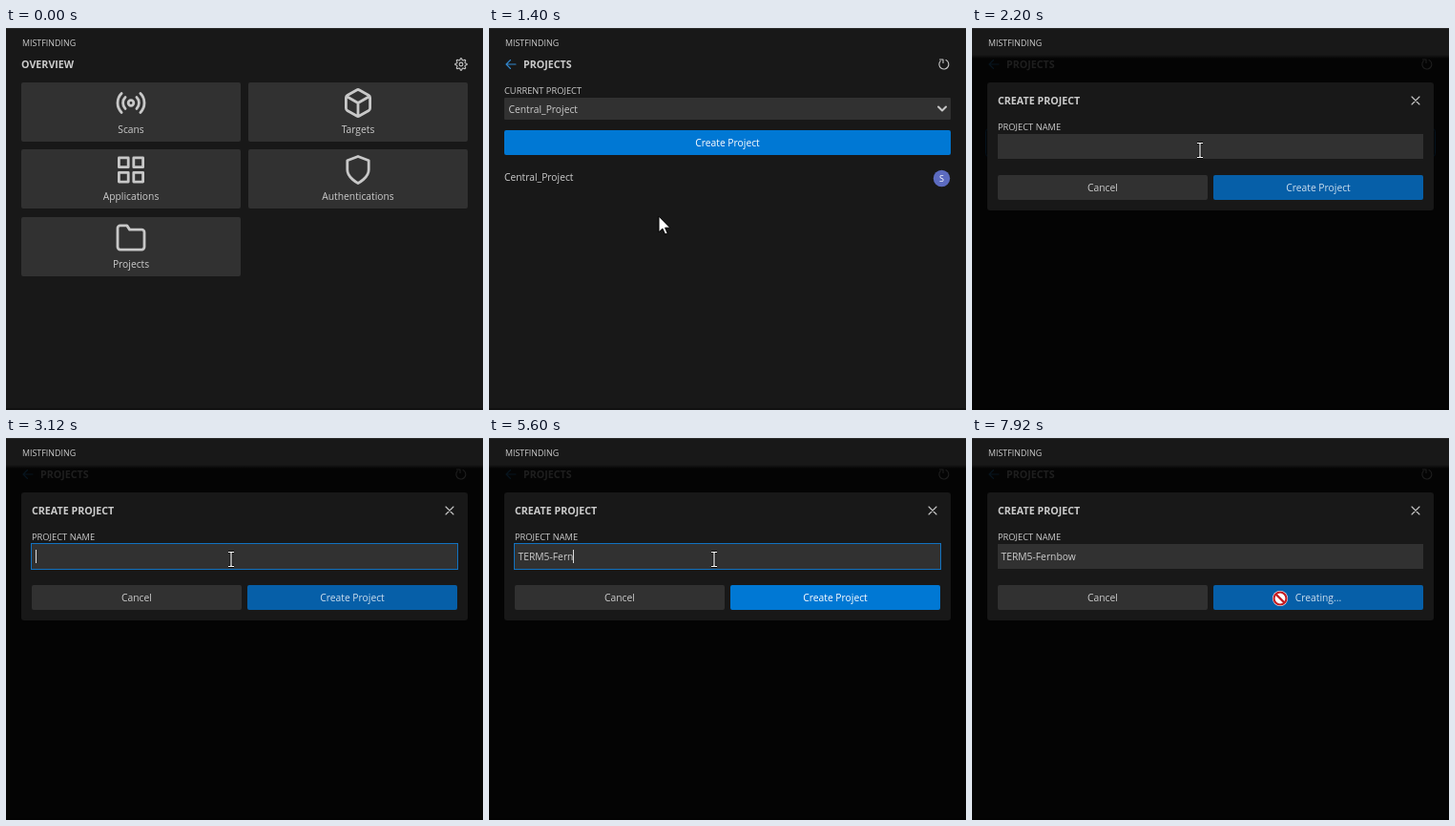
An HTML page for the animation above (8 s loop, 500 by 400 pixels).

```html
<!DOCTYPE html>
<html lang="en">
<head>
<meta charset="utf-8">
<title>Create project</title>
<style>
  html, body { margin: 0; width: 100%; height: 100%; overflow: hidden; background: #181818; }
  svg { display: block; width: 500px; height: 400px; }
  text { font: 10.3px "Open Sans", "Noto Sans", sans-serif; fill: #ccc; white-space: pre; }
  .title { font-size: 10.7px; font-weight: 700; }
  .label { font-size: 9.3px; }
  .brand { font-size: 8.9px; }
  .mid { text-anchor: middle; }
  .on-blue { fill: #fff; }
  .field { fill: #313131; }
  .icon, .thin { fill: none; stroke: #c8c8c8; stroke-width: 2; stroke-linecap: round; stroke-linejoin: round; }
  .thin { stroke-width: 1.1; }
  .ring { fill: none; stroke: #1272c0; }
  .cursor path { fill: #fff; stroke: #000; stroke-linejoin: round; }
</style>
</head>
<body>
<svg viewBox="0 0 500 400">
  <defs>
    <linearGradient id="shade" x2="0" y2="1">
      <stop offset="0" stop-color="#181818"/>
      <stop offset="1" stop-color="#181818" stop-opacity="0"/>
    </linearGradient>
  </defs>
  <rect width="500" height="400" fill="#181818"/>

  <g id="overview">
    <text class="title" x="16" y="42">OVERVIEW</text>
    <g transform="translate(477 38)">
      <path id="gear" class="thin"/>
      <circle class="thin" r="1.9"/>
    </g>
    <g id="cards"></g>
    <rect id="cardRing" class="ring" x="15.5" y="197.5" width="231" height="63" rx="1"/>
  </g>

  <g id="projects">
    <path class="thin" d="M28 38H18m4.500-4.500L18 38l4.500 4.500" style="stroke:#3287cd"/>
    <text class="title" x="36" y="42">PROJECTS</text>
    <path class="thin" d="M479 33.500A5 5 0 1 1 473.200 34.600M472.500 33h3.500v3.500" />
    <text class="label" x="16" y="69">CURRENT PROJECT</text>
    <rect class="field" x="16" y="73" width="468" height="23" rx="1"/>
    <text x="20.500" y="89">Central_Project</text>
    <path class="icon" d="M471 82.500l4 4 4-4"/>
    <rect id="openButton" x="16" y="107" width="468" height="26" rx="2"/>
    <rect id="openRing" class="ring" x="14.500" y="105.500" width="471" height="29" rx="3"/>
    <text class="mid on-blue" x="250" y="124">Create Project</text>
    <text x="16" y="160">Central_Project</text>
    <circle cx="474.500" cy="157.500" r="8.700" fill="#5c6bc0"/>
    <text class="mid on-blue" x="474.500" y="161" style="font-size:9px">S</text>
  </g>

  <g id="modal">
    <rect width="500" height="400" opacity=".85"/>
    <rect width="500" height="28" fill="#181818"/>
    <rect y="28" width="500" height="4" fill="url(#shade)"/>
    <rect x="16" y="57" width="468" height="134" rx="3" fill="#181818"/>
    <text class="title" x="27" y="80">CREATE PROJECT</text>
    <path class="thin" d="M461 72l8 8m0-8l-8 8"/>
    <text class="label" x="27" y="107">PROJECT NAME</text>
    <rect class="field" x="27" y="111" width="446" height="26"/>
    <rect id="inputRing" class="ring" x="26.500" y="110.500" width="447" height="27"/>
    <text id="typed" x="30.500" y="128"></text>
    <rect id="caret" y="117" width="1" height="14" fill="#ddd"/>
    <rect class="field" x="27" y="154" width="220" height="26" rx="2"/>
    <text class="mid" x="137" y="171">Cancel</text>
    <rect id="submit" x="253" y="154" width="220" height="26" rx="2"/>
    <text id="submitText" class="mid on-blue" x="363" y="171"></text>
  </g>

  <rect width="500" height="1" fill="#2b2b2b"/>
  <rect y="398" width="500" height="2" opacity=".3"/>
  <text class="brand" x="17" y="19">MISTFINDING</text>

  <g id="cursor" class="cursor">
    <g data-kind="arrow"><path d="M0 0V16.500L3.900 12.900 6.600 18.900 9.200 17.700 6.600 12H11.800Z"/></g>
    <g data-kind="hand"><path d="M-1.800 1.500Q-1.800 0 0 0T1.800 1.500V7Q4.400 6.300 4.800 8 7 7.400 7.400 9 9.700 8.800 9.700 11V15Q9.500 18 7.800 19.500V22H-.800V20Q-3.500 17.500-5.600 13.500-6.800 11-5 10.600-3.500 10.500-1.800 13Z"/></g>
    <g data-kind="beam">
      <path d="M-3-7.500H-.8L0-7 .8-7.500H3M0-7V7M-3 7.500H-.8L0 7 .8 7.500H3" style="fill:none;stroke-width:2.600"/>
      <path d="M-3-7.500H-.8L0-7 .8-7.500H3M0-7V7M-3 7.500H-.8L0 7 .8 7.500H3" style="fill:none;stroke:#fff;stroke-width:1.200"/>
    </g>
    <g data-kind="ban">
      <circle r="8" fill="#fff"/>
      <circle r="6.500" fill="#fff" stroke="#c41e24" stroke-width="2.200"/>
      <path d="M-4.500-4.500L4.500 4.500" style="stroke:#c41e24;stroke-width:2.400"/>
    </g>
  </g>
</svg>
<script>
const LOOP = 8000, STEP = 40;
const CLICK_CARD = 920, SHOW_PROJECTS = 1120, CLICK_OPEN = 2000, SHOW_MODAL = 2080;
const FOCUS_INPUT = 2600, ENABLE = 4600, SUBMIT = 7400, BLOCKED = 7480;
const NAME = 'TERM5-Fernbow';
const KEYS = [3700, 3840, 4000, 4160, 4540, 4700, 4900, 5120, 5480, 5600, 5880, 6000, 6200];

// time, x, y of the pointer's hot spot
const PATH = [
  [40, 421, 396], [800, 131, 248], [1160, 131, 248], [1660, 231, 140],
  [1840, 231, 140], [1980, 238, 124], [2080, 238, 124], [2200, 239, 128],
  [2560, 239, 128], [2900, 236, 127], [6660, 236, 127], [7040, 284, 149],
  [7340, 323, 171], [7460, 323, 175], [7560, 323, 175], [7880, 323, 168]
];

const CARDS = [
  ['Scans', 16, 57, 'M10 12a2 2 0 1 0 4 0a2 2 0 1 0-4 0M16.240 7.760a6 6 0 0 1 0 8.480M7.760 16.240a6 6 0 0 1 0-8.480M19.070 4.930a10 10 0 0 1 0 14.140M4.930 19.070a10 10 0 0 1 0-14.140'],
  ['Targets', 254, 57, 'M21 8a2 2 0 0 0-1-1.700l-7-4a2 2 0 0 0-2 0l-7 4A2 2 0 0 0 3 8v8a2 2 0 0 0 1 1.700l7 4a2 2 0 0 0 2 0l7-4a2 2 0 0 0 1-1.700ZM3.300 7L12 12l8.700-5M12 22V12'],
  ['Applications', 16, 127, 'M3 3h7v7H3ZM14 3h7v7h-7ZM14 14h7v7h-7ZM3 14h7v7H3Z'],
  ['Authentications', 254, 127, 'M12 22s8-4 8-10V5l-8-3-8 3v7c0 6 8 10 8 10Z'],
  ['Projects', 16, 198, 'M22 19a2 2 0 0 1-2 2H4a2 2 0 0 1-2-2V5a2 2 0 0 1 2-2h5l2 3h9a2 2 0 0 1 2 2Z']
];

const $ = id => document.getElementById(id);
const show = (el, on) => { el.style.display = on ? '' : 'none'; };
const inside = (p, x, y, w, h) => p.x >= x && p.x < x + w && p.y >= y && p.y < y + h;

$('cards').innerHTML = CARDS.map(([name, x, y, d]) => `
  <rect class="field" x="${x}" y="${y}" width="230" height="62" rx="2"/>
  <path class="icon" d="${d}" transform="translate(${x + 115} ${y + 21.5}) scale(1.4) translate(-12 -12)"/>
  <text class="mid" x="${x + 115}" y="${y + 53}">${name}</text>`).join('');
const cardRects = [...$('cards').querySelectorAll('rect')];

const gearPoints = Array.from({ length: 32 }, (_, i) => {
  const angle = (i - 0.5) * Math.PI / 16;
  const radius = i % 4 < 2 ? 6.2 : 4.5;
  return `${(radius * Math.cos(angle)).toFixed(2)} ${(radius * Math.sin(angle)).toFixed(2)}`;
});
$('gear').setAttribute('d', `M${gearPoints.join('L')}Z`);

function pointerAt(t) {
  const next = PATH.findIndex(([time]) => time > t);
  const [t0, x0, y0] = PATH.at(next < 0 ? -1 : Math.max(0, next - 1));
  if (next < 1) return { x: x0, y: y0 };
  const [t1, x1, y1] = PATH[next];
  const u = (t - t0) / (t1 - t0);
  const k = u * u * (3 - 2 * u);
  return { x: x0 + (x1 - x0) * k, y: y0 + (y1 - y0) * k };
}

function cursorKind(t, p) {
  if (t >= BLOCKED) return 'ban';
  if (t >= SHOW_MODAL) {
    if (inside(p, 27, 111, 446, 26)) return 'beam';
    return inside(p, 253, 154, 220, 26) ? 'hand' : 'arrow';
  }
  if (t >= SHOW_PROJECTS) return inside(p, 16, 107, 468, 26) ? 'hand' : 'arrow';
  return CARDS.some(([, x, y]) => inside(p, x, y, 230, 62)) ? 'hand' : 'arrow';
}

function drawModal(t, p) {
  const focused = t >= FOCUS_INPUT && t < SUBMIT;
  const count = KEYS.filter(time => time <= t).length;
  const lastInput = count ? KEYS[count - 1] : FOCUS_INPUT;
  $('typed').textContent = NAME.slice(0, count);
  show($('inputRing'), focused);
  show($('caret'), focused && (t - lastInput) % 1060 < 530);
  $('caret').setAttribute('x', Math.round(30.5 + (count ? $('typed').getComputedTextLength() : 0)));

  const enabled = t >= ENABLE && t < SUBMIT;
  const hover = inside(p, 253, 154, 220, 26);
  $('submit').setAttribute('fill', !enabled ? '#065fa8' : hover ? '#026ec1' : '#0078d4');
  $('submitText').textContent = t >= SUBMIT ? 'Creating...' : 'Create Project';
  $('submitText').style.fillOpacity = enabled ? 1 : 0.8;
}

function render(time) {
  const t = Math.floor(time % LOOP / STEP) * STEP;
  const p = pointerAt(t);
  show($('overview'), t < SHOW_PROJECTS);
  show($('projects'), t >= SHOW_PROJECTS);
  show($('modal'), t >= SHOW_MODAL);

  cardRects.forEach((rect, i) => {
    const [, x, y] = CARDS[i];
    rect.style.fill = t >= STEP && inside(p, x, y, 230, 62) ? '#252525' : '';
  });
  show($('cardRing'), t >= CLICK_CARD);
  show($('openRing'), t >= CLICK_OPEN && t < FOCUS_INPUT);
  const openHover = t < SHOW_MODAL && inside(p, 16, 107, 468, 26);
  $('openButton').setAttribute('fill', openHover ? '#026ec1' : '#0078d4');
  if (t >= SHOW_MODAL) drawModal(t, p);

  const kind = cursorKind(t, p);
  show($('cursor'), t >= STEP);
  $('cursor').setAttribute('transform', `translate(${p.x.toFixed(1)} ${p.y.toFixed(1)})`);
  for (const shape of $('cursor').children) show(shape, shape.dataset.kind === kind);
}

const start = performance.now();
function tick() {
  render(performance.now() - start);
  requestAnimationFrame(tick);
}
tick();
</script>
</body>
</html>
```
